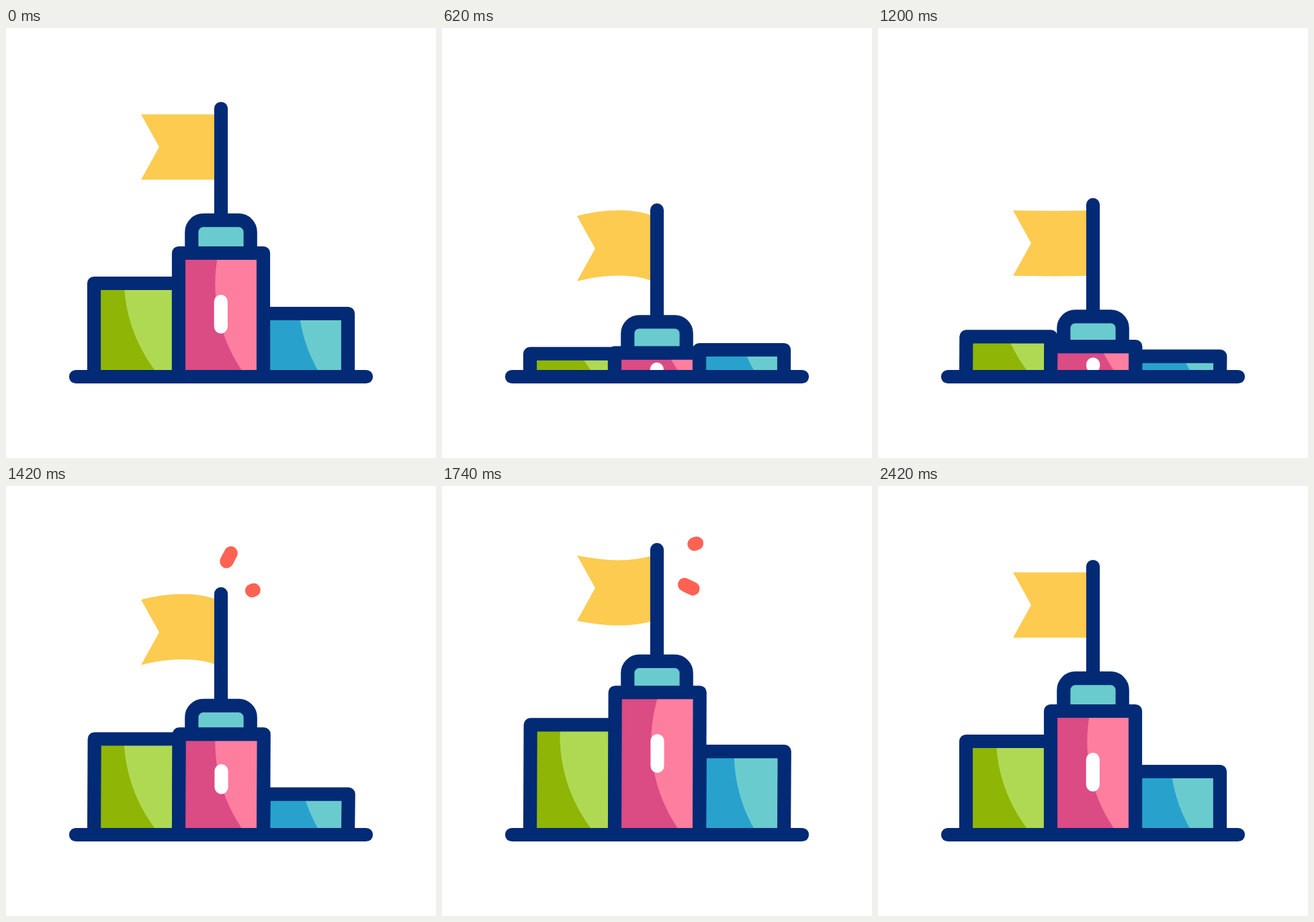
Write an HTML page with a canvas that moves like this. It is 640 px wide and 640 px high and loops after 3600 ms.

```html
<!DOCTYPE html>
<html>
<head>
<meta charset="utf-8">
<title>Podium</title>
<style>
html, body { margin: 0; width: 100%; height: 100%; overflow: hidden; background: #fff; }
canvas { display: block; width: 100vw; height: 100vh; }
</style>
</head>
<body>
<canvas width="640" height="640"></canvas>
<script>
const LOOP = 3600, ACTIVE = 2420, RISE = 530, SETTLE = 600;
const BASE = 519, LINE = 20.2, NAVY = '#022a75', TEAL = '#6acbcf';
const ctx = document.querySelector('canvas').getContext('2d');

const clamp = u => Math.min(1, Math.max(0, u));
const glide = u => (1 - Math.cos(Math.PI * clamp(u))) / 2;
const sink = ms => 1 - Math.exp(-((Math.max(0, ms) / 240) ** 1.5));

// Sink by `low`, rise past the rest position by `over`, then settle.
function drop({ low, fall, rise, over = 30 }, t) {
  return low * sink(t - fall)
    - (low + over) * glide((t - rise) / RISE)
    + over * glide((t - rise - RISE) / SETTLE);
}

const lean = t => 0.7 * (glide((t - 1000) / 400) - glide((t - 1750) / SETTLE));
const wave = t => t < ACTIVE ? 8.5 * Math.sin(6 * Math.PI * t / ACTIVE) : 0;

const cap = { low: 155.5, fall: 60, rise: 1112, over: 27 };
const left = { low: 106.5, fall: 4, rise: 1045,
  x: 131, top: 380, dark: '#8fb506', light: '#b0d953', cx: 403.5, cy: 372 };
const right = { low: 63.7, fall: 255, rise: 1218,
  x: 383, top: 425, dark: '#28a2cd', light: TEAL, cx: 662.8, cy: 398 };
const middle = { low: 153.5, fall: 72, rise: 1105,
  x: 257, top: 335, dark: '#db4b84', light: '#fe7e9f', cx: 539.3, cy: 381 };
const pillTop = { ...middle, low: 104 };
const pillEnd = { ...middle, low: 66 };

const rays = [
  [328.3, 71.5, 334.8, 59.2],
  [366, 115, 379, 110.5],
  [361, 172, 373.5, 178]
];

function line(color, x0, y0, x1, y1) {
  ctx.strokeStyle = color;
  ctx.beginPath();
  ctx.moveTo(x0, y0);
  ctx.lineTo(x1, y1);
  ctx.stroke();
}

function paint(path, fill) {
  ctx.fillStyle = fill;
  ctx.fill(path);
}

// Outline without round ends
function outline(path) {
  ctx.strokeStyle = NAVY;
  ctx.lineCap = 'butt';
  ctx.stroke(path);
  ctx.lineCap = 'round';
}

function drawFlag(bend) {
  const b = bend * 4 / 3, top = 128.5, bottom = 225.7;
  const flag = new Path2D();
  flag.moveTo(201, top);
  flag.bezierCurveTo(245, top + b, 285, top + b, 314, top);
  flag.lineTo(314, bottom);
  flag.bezierCurveTo(285, bottom + b, 245, bottom + b, 201, bottom);
  flag.lineTo(228, (top + bottom) / 2);
  paint(flag, '#fdcb50');
}

function drawCap() {
  line(NAVY, 320, 120, 320, 286);
  const path = new Path2D('M276.3 332V303.5a17.3 17.3 0 0 1 17.3-17.3h52.8a17.3 17.3 0 0 1 17.3 17.3V332');
  paint(path, TEAL);
  outline(path);
}

function drawRays(t) {
  rays.forEach(([x0, y0, x1, y1], i) => {
    const ms = t - 1300 - 100 * i;
    const head = clamp(ms / 100), tail = clamp((ms - 272) / 95);
    if (head === 0 || tail === 1) return;
    const dx = x1 - x0, dy = y1 - y0;
    line('#ff6252', x0 + dx * tail, y0 + dy * tail, x0 + dx * head, y0 + dy * head);
  });
}

function drawBox(box, t) {
  const y = box.top + drop(box, t), dx = lean(t);
  const shape = new Path2D();
  shape.moveTo(box.x, BASE);
  shape.lineTo(box.x + dx, y);
  shape.lineTo(box.x + 126 + dx, y);
  shape.lineTo(box.x + 126, BASE);
  paint(shape, box.dark);

  ctx.save();
  ctx.clip(shape);
  const glow = new Path2D();
  glow.arc(box.cx, box.cy, 228, 0, 7);
  paint(glow, box.light);
  if (box === middle) {
    const x = 319.8 + dx;
    line('#fff', x, 407.1 + drop(pillTop, t), x, 444.6 + drop(pillEnd, t));
  }
  ctx.restore();
  outline(shape);
}

function draw(t) {
  ctx.fillStyle = '#fff';
  ctx.fillRect(0, 0, 640, 640);
  ctx.lineWidth = LINE;
  ctx.lineCap = ctx.lineJoin = 'round';

  ctx.save();
  ctx.translate(0, drop(cap, t));
  drawFlag(wave(t));
  drawCap();
  drawRays(t);
  ctx.restore();

  for (const box of [left, right, middle]) drawBox(box, t);
  line(NAVY, 104, BASE, 536, BASE);
}

const begin = performance.now();
function frame() {
  draw((performance.now() - begin) % LOOP);
  requestAnimationFrame(frame);
}
frame();
</script>
</body>
</html>
```
